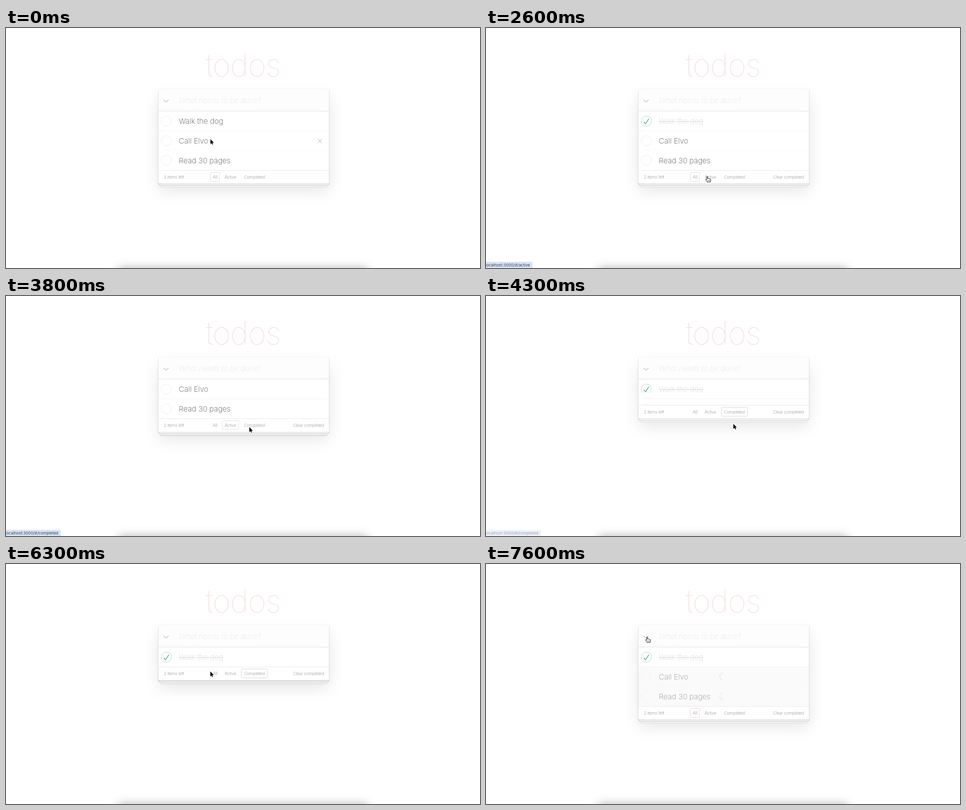
Write an HTML page with a canvas that moves like this. It is 960x486 px and loops after 8 s.

```html
<!DOCTYPE html>
<html lang="en">
<head>
<meta charset="utf-8">
<title>todos</title>
<style>
  html, body { margin: 0; width: 100%; height: 100%; overflow: hidden; background: #fff; }
  canvas { display: block; width: 960px; height: 486px; }
</style>
</head>
<body>
<canvas id="stage" width="960" height="486"></canvas>
<script>
const ctx = document.getElementById('stage').getContext('2d');
const LOOP = 8000, STEP = 100, SCALE = 0.627;
const LEFT = 309, WIDTH = 345, TOP = 124, LIST_TOP = 168.5, ROW = 39.7, FOOTER = 27.8;
const FAMILY = 'Inter, "Liberation Sans", sans-serif';
const TASKS = ['Walk the dog', 'Call Elvo', 'Read 30 pages'];
const FILTERS = [
  { name: 'All', x: 414, w: 19, border: '#f0d8d8' },
  { name: 'Active', x: 437.5, w: 34, border: '#e8e0e0' },
  { name: 'Completed', x: 476, w: 54, border: '#d9d9d9' }
];
const STATUS = [
  { from: 2500, to: 3300, path: 'active', w: 94 },
  { from: 3800, to: 4400, path: 'completed', w: 111, fade: 4300 },
  { from: 6400, to: 7000, path: '', w: 71 }
];

// Pointer positions: time, x, y
const POINTER = [
  [0, 414, 225], [100, 354, 213], [200, 354, 213], [500, 319, 189], [600, 319, 189],
  [700, 320, 188.5], [1500, 320, 188.5], [2400, 448, 285], [2600, 448.5, 300.5], [3500, 448.5, 300.5],
  [3900, 501, 259], [4600, 501, 259], [5300, 322.5, 150.5], [5500, 322.5, 150.5],
  [6400, 417, 220], [7000, 417, 220], [7200, 328, 149], [7300, 328, 149], [7400, 326.7, 147.5]
];
const HAND_TIMES = [[500, 1700], [2600, 2900], [3900, 4100], [5200, 5700], [6400, 6700], [7200, LOOP]];
const ARROW = new Path2D('M0 0V10.2L2.3 8 3.8 11.3 5.4 10.6 4 7.4 7 7.3Z');
const HAND = new Path2D('M-1.3 1Q-1.3 0-.4 0Q.6 0 .6 1V4.4Q1 3.8 2 4Q2.6 4.2 2.8 4.8Q4 4.2 4.6 5.1Q6.3 4.8 6.6 6.2V8Q6 9.7 5.6 11.4H-.6Q-1 10-2 8.9L-3.4 7.2Q-4 6.2-3.2 5.8Q-2.3 5.5-1.3 6.6Z');
const FINGERS = new Path2D('M.8 7.3V9.6M2.6 7.3V9.6M4.4 7.3V9.6');
const TICK = new Path2D('M22-25L-8 21-23 6-27 10-7 30 27-22Z');

const clamp = v => Math.min(1, Math.max(0, v));
const smooth = v => { v = clamp(v); return v * v * (3 - 2 * v); };
const within = (t, a, b) => t >= a && t < b;

function pointerAt(t) {
  const i = POINTER.findIndex(k => k[0] > t);
  if (i < 0) return POINTER[POINTER.length - 1].slice(1);
  const [t0, x0, y0] = POINTER[i - 1], [t1, x1, y1] = POINTER[i];
  const u = smooth((t - t0) / (t1 - t0));
  return [x0 + (x1 - x0) * u, y0 + (y1 - y0) * u];
}

function rowHeights(t) {
  const slide = start => smooth((t - start) / 400);
  const done = 1 - slide(2900) + slide(4050);
  const open = 1 - slide(4050) + slide(6650);
  return [done, open, open].map(v => v * ROW);
}

function hoveredRow(t) {
  if (within(t, 7000, 7400)) return 1;
  const seen = Math.max(0, t - 30);
  const y = pointerAt(t)[1];
  let top = LIST_TOP;
  return rowHeights(seen).findIndex(h => {
    const inside = y >= top && y < top + h;
    top += h;
    return inside;
  });
}

function text(str, x, y, size, weight, color, { align = 'left', spacing = 0, style = '' } = {}) {
  ctx.font = `${style} ${weight} ${size}px ${FAMILY}`;
  ctx.letterSpacing = spacing + 'px';
  ctx.textAlign = align;
  ctx.fillStyle = color;
  ctx.fillText(str, x, y);
}

function rect(x, y, w, h, color) {
  ctx.fillStyle = color;
  ctx.fillRect(x, y, w, h);
}

function line(points, color, width) {
  ctx.beginPath();
  points.forEach(([x, y]) => ctx.lineTo(x, y));
  ctx.strokeStyle = color;
  ctx.lineWidth = width;
  ctx.stroke();
}

// Blurred box drawn alone, like a CSS box-shadow
function shadow(x, y, w, h, dy, blur, spread, color) {
  ctx.save();
  ctx.shadowColor = color;
  ctx.shadowBlur = blur;
  ctx.shadowOffsetX = 2000;
  rect(x - spread - 2000, y + dy - spread, w + 2 * spread, h + 2 * spread, '#000');
  ctx.restore();
}

function drawCard(footerTop) {
  const bottom = footerTop + FOOTER;
  const drop = (dy, blur, alpha) =>
    shadow(LEFT, TOP, WIDTH, bottom - TOP, dy * SCALE, blur * SCALE, 0, `rgba(0,0,0,${alpha})`);
  const sheet = (dy, blur, spread, color) =>
    shadow(LEFT, footerTop, WIDTH, FOOTER, dy * SCALE, blur * SCALE, spread * SCALE, color);
  drop(25, 50, 0.1);
  drop(2, 4, 0.2);
  sheet(17, 2, -6, 'rgba(0,0,0,.26)');
  sheet(16, 0, -6, '#f6f6f6');
  sheet(9, 1, -3, 'rgba(0,0,0,.26)');
  sheet(8, 0, -3, '#f6f6f6');
  sheet(1, 1, 0, 'rgba(0,0,0,.26)');
  rect(LEFT, TOP, WIDTH, bottom - TOP, '#fff');
}

function drawInput() {
  rect(LEFT, TOP, WIDTH, 44, '#fdfdfd');
  rect(LEFT, 167, WIDTH, 1, '#f4f4f4');
  rect(LEFT, 168, WIDTH, 1, '#e2e2e2');
  line([[318.8, 145.8], [324.2, 149.7], [329.6, 145.8]], '#d4d4d4', 2);
  text('What needs to be done?', 350, 152.3, 15, 200, '#e6e6e6', { style: 'italic' });
}

function drawCircle(y, done) {
  ctx.beginPath();
  ctx.arc(324.7, y, 10.2, 0, Math.PI * 2);
  ctx.strokeStyle = done ? '#b4d9d1' : '#efefef';
  ctx.lineWidth = 1;
  ctx.stroke();
  if (!done) return;
  ctx.save();
  ctx.translate(324.7, y);
  ctx.scale(0.21, 0.21);
  ctx.fillStyle = '#3ea390';
  ctx.fill(TICK);
  ctx.restore();
}

function drawRow(i, top, height, t, hovered) {
  if (height < 0.5) return;
  const done = i === 0 && t >= 900;
  const saving = i === 0 && within(t, 700, 900);
  const waiting = i > 0 && t >= 7600;
  const grey = done ? Math.round(77 + 140 * clamp((t - 800) / 400)) : 77;
  const color = `rgb(${grey},${grey},${grey})`;

  ctx.save();
  ctx.beginPath();
  ctx.rect(LEFT, top, WIDTH, height + 0.5);
  ctx.clip();
  rect(LEFT, top, WIDTH, height + 1, waiting ? '#fafafa' : '#fff');
  ctx.globalAlpha = saving || waiting ? 0.6 : 1;
  drawCircle(top + 20.1, done);
  text(TASKS[i], 350, top + 25.8, 15.1, 200, color, { spacing: 0.05 });
  if (done) rect(350, Math.round(top + 20.5), ctx.measureText(TASKS[i]).width, 1, color);
  if (hovered) {
    const x = 635.8, y = top + Math.max(height / 2 + 0.7, 12.6);
    line([[x - 4, y - 4], [x + 4, y + 4]], '#cc9a9a', 1);
    line([[x - 4, y + 4], [x + 4, y - 4]], '#cc9a9a', 1);
  }
  ctx.globalAlpha = 1;
  if (waiting) {
    ctx.beginPath();
    ctx.arc(481, top + 20, 7.5, Math.PI * 0.55, Math.PI * 1.45);
    ctx.strokeStyle = '#dedede';
    ctx.lineWidth = 1;
    ctx.stroke();
  }
  ctx.restore();
  rect(LEFT, Math.round(top + height) - 0.2, WIDTH, 1, '#e9e9e9');
}

function drawFooter(top, t) {
  const base = top + 17;
  const label = (str, x, align) => text(str, x, base, 8.6, 200, '#777', { align, spacing: -0.14 });
  const selected = t < 2700 || t >= 6500 ? 0 : t < 3900 ? 1 : 2;
  label(`${t < 900 ? 3 : 2} items left`, 319.5, 'left');
  FILTERS.forEach(({ name, x, w, border }, i) => {
    label(name, x + w / 2, 'center');
    if (i !== selected) return;
    ctx.beginPath();
    ctx.roundRect(x + 0.5, Math.round(top + 4) + 0.5, w - 1, 18, 2);
    ctx.strokeStyle = border;
    ctx.lineWidth = 1;
    ctx.stroke();
  });
  if (t >= 900) label('Clear completed', 644, 'right');
}

function drawStatus(t) {
  const bar = STATUS.find(s => within(t, s.from, s.to));
  if (!bar) return;
  ctx.globalAlpha = t >= bar.fade ? 0.45 : 1;
  ctx.beginPath();
  ctx.roundRect(-4, 473.5, bar.w + 4, 20, 3);
  ctx.fillStyle = '#d5e2f8';
  ctx.fill();
  text('localhost:3000/#/' + bar.path, bar.w - 5, 483.3, 8, 400, '#3c4043', { align: 'right' });
  ctx.globalAlpha = 1;
}

function drawPointer(t) {
  const hand = HAND_TIMES.some(([a, b]) => within(t, a, b));
  ctx.save();
  ctx.translate(...pointerAt(t));
  ctx.lineJoin = 'round';
  ctx.lineWidth = hand ? 1 : 1.2;
  ctx.strokeStyle = hand ? '#111' : '#fff';
  ctx.fillStyle = hand ? '#fff' : '#000';
  const shape = hand ? HAND : ARROW;
  if (hand) ctx.fill(shape);
  ctx.stroke(shape);
  if (hand) {
    ctx.lineWidth = 0.6;
    ctx.stroke(FINGERS);
  } else {
    ctx.fill(shape);
  }
  ctx.restore();
}

function draw(now) {
  const t = Math.floor((now % LOOP) / STEP) * STEP;
  const heights = rowHeights(t);
  const footerTop = LIST_TOP + heights.reduce((a, b) => a + b);
  const hovered = hoveredRow(t);

  rect(0, 0, 960, 486, '#fff');
  shadow(228, 488, 504, 60, 0, 19, 0, 'rgba(0,0,0,.36)');
  text('todos', 480.3, 97.5, 64, 100, 'rgba(175,47,47,.15)', { align: 'center', spacing: -1.3 });
  drawCard(footerTop);
  drawInput();
  let top = LIST_TOP;
  heights.forEach((h, i) => {
    drawRow(i, top, h, t, i === hovered);
    top += h;
  });
  drawFooter(footerTop, t);
  drawStatus(t);
  drawPointer(t);
  requestAnimationFrame(draw);
}
requestAnimationFrame(draw);
</script>
</body>
</html>
```
